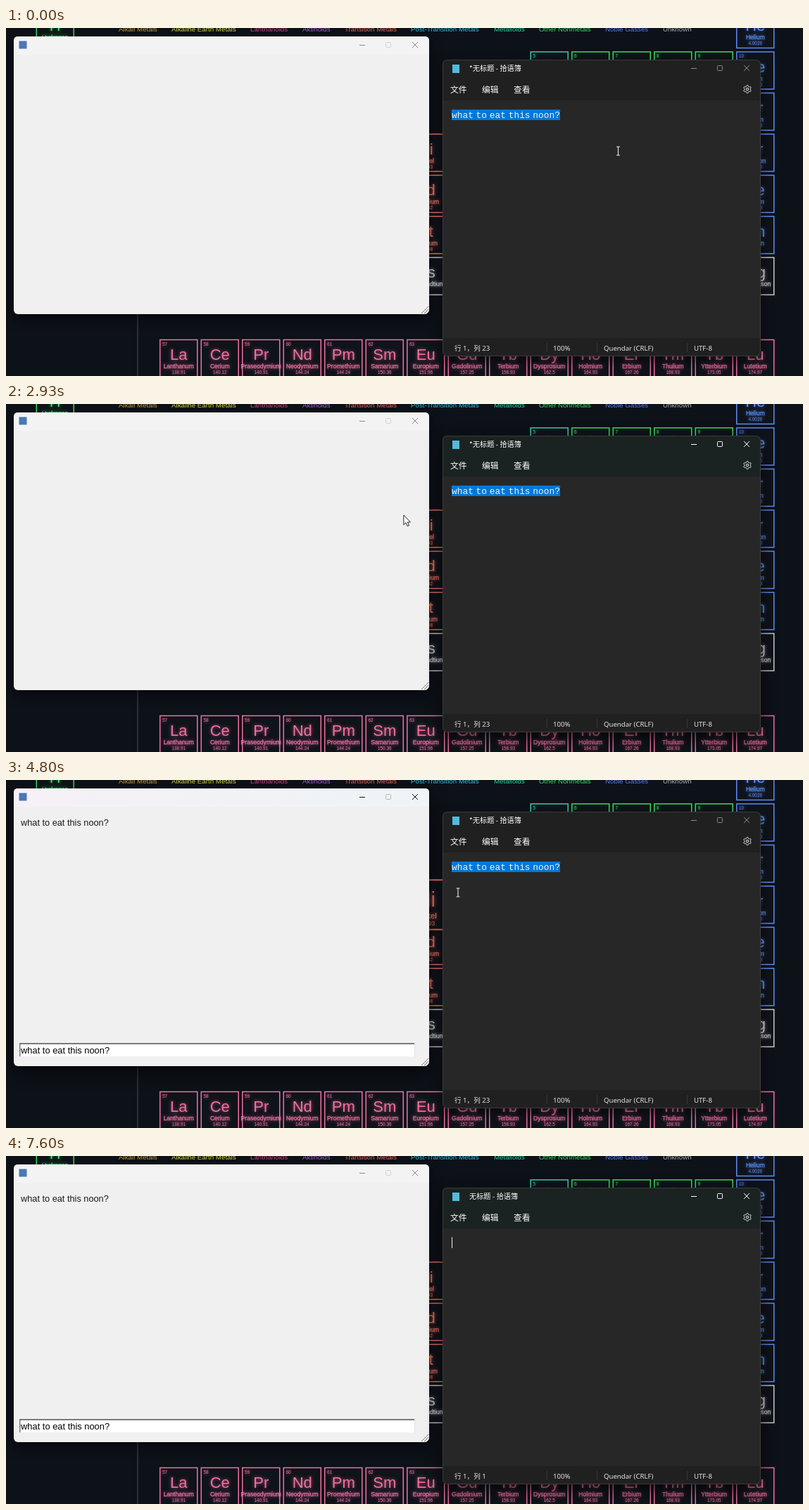
These frames come from a looping animation (1132 by 495 pixels, 8 s). An HTML page:

```html
<!DOCTYPE html>
<html lang="zh">
<head>
<meta charset="utf-8">
<style>
html, body { margin: 0; width: 100%; height: 100%; overflow: hidden; background: #0d1118; }
svg { display: block; font-family: "Liberation Sans", Arial, sans-serif; }
text { white-space: pre; }
.tile text { text-anchor: middle; fill: currentColor; }
.glow { filter: drop-shadow(0 0 2.5px color-mix(in srgb, currentColor 70%, transparent)); }
.window { filter: drop-shadow(0 7px 8px rgba(0, 0, 0, .5)); }
.window.active { filter: drop-shadow(0 8px 11px rgba(0, 0, 0, .68)); }
.buttons { fill: none; stroke: #8a8a8a; }
#form .off { stroke: #d2d2d2; }
#form.active .buttons { stroke: #111; }
#form.active .off { stroke: #b4b4b4; }
#pad.active .buttons { stroke: #fff; }
.cjk { font-family: "Noto Sans CJK SC", "Noto Sans CJK", sans-serif; fill: #fff; }
.status { font: 9.6px "Noto Sans", "Noto Sans CJK SC", sans-serif; fill: #e4e4e4; }
#typed { font: 12.87px "Liberation Mono", monospace; word-spacing: -3.96px; fill: #f2f2f2; }
</style>
</head>
<body>
<script>
const LOOP = 8000, STEP = 1000 / 15;
const PITCH = 58.5, LEFT = 42.5, TOP = 33.2, SIZE = 54.5;
const PHRASE = 'what to eat this noon?';
const PINK = '#f0709f', GREEN = '#38de60', TEAL = '#32d3ab', BLUE = '#5a8df4', RED = '#ef7061', GRAY = '#cacaca';

const text = (x, y, size, value, attrs = '') =>
  `<text x="${x}" y="${y}" font-size="${size}" ${attrs}>${value}</text>`;
const rect = (x, y, w, h, fill, attrs = '') =>
  `<rect x="${x}" y="${y}" width="${w}" height="${h}" fill="${fill}" ${attrs}/>`;

function tile(x, y, color, [number, symbol, name, mass], id = '') {
  return `<g id="${id}"><g class="tile" style="color:${color}" transform="translate(${x} ${y})">
    ${rect(.75, .75, SIZE - 1.5, SIZE - 1.5, '#0f131a', 'stroke="currentColor" stroke-width="1.5"')}
    <g class="glow">
    ${text(4, 9, 6.4, number, 'style="text-anchor:start"')}
    ${text(SIZE / 2, 29.5, 22, symbol)}
    ${text(SIZE / 2, 41.6, 8.6, name, 'stroke="currentColor" stroke-width=".25"')}
    ${text(SIZE / 2, 49.6, 6.4, mass)}</g></g></g>`;
}
const cell = (column, row, color, spec, id) =>
  tile(LEFT + (column - 1) * PITCH, TOP + (row - 2) * PITCH, color, spec.split(' '), id);

const legend = [
  [160, '#c79b3a', 'Alkali Metals'], [235, '#d2d445', 'Alkaline Earth Metals'],
  [347, '#b94a7c', 'Lanthanoids'], [421, '#a563bd', 'Aktinoids'],
  [481, '#dc6856', 'Transition Metals'], [575, '#35b9cf', 'Post-Transition Metals'],
  [693, '#2bcf9c', 'Metalloids'], [757, '#3bd65f', 'Other Nonmetals'],
  [851, '#567fe0', 'Noble Gasses'], [933, '#a9a9a9', 'Unknown'],
].map(([x, color, label]) => text(x, 5.3, 9.75, label, `fill="${color}"`)).join('');

const lanthanoids = `La Lanthanum 138.91,Ce Cerium 140.12,Pr Praseodymium 140.91,Nd Neodymium 144.24,
Pm Promethium 144.24,Sm Samarium 150.36,Eu Europium 151.96,Gd Gadolinium 157.25,Tb Terbium 158.93,
Dy Dysprosium 162.5,Ho Holmium 164.93,Er Erbium 167.26,Tm Thulium 168.93,Yb Ytterbium 173.05,
Lu Lutetium 174.97`.split(',')
  .map((spec, i) => tile(218 + i * PITCH, 442.7, PINK, [57 + i, ...spec.trim().split(' ')])).join('');

const nobles = ['2 He Helium 4.0026', '10 Ne Neon 20.180', '18 Ar Argon 39.948', '36 Kr Krypton 83.798',
  '54 Xe Xenon 131.29', '86 Rn Radon 222', '118 Og Oganesson 294']
  .map((spec, i) => cell(18, i + 1, i < 6 ? BLUE : GRAY, spec)).join('');

const table = legend + lanthanoids + nobles + cell(1, 1, GREEN, '1 H Hydrogen 1.008') +
  ['5 B Boron 10.81', '6 C Carbon 12.011', '7 N Nitrogen 14.007', '8 O Oxygen 15.999', '9 F Fluorine 18.998']
    .map((spec, i) => cell(13 + i, 2, i ? GREEN : TEAL, spec)).join('') +
  cell(10, 5, RED, '46 Pd Palladium 106.42') + cell(10, 6, RED, '78 Pt Platinum 195.08') +
  cell(10, 7, GRAY, '110 Ds Darmstadtium 281') + cell(10, 4, RED, '28 Ni Nickel 58.693', 'nickel');

const buttons = (x, y, off = '') => `<g class="buttons">
  <path d="M${x - 4} ${y + .5}h8"/>
  <rect class="${off}" x="${x + 33.5}" y="${y - 3.5}" width="7" height="7" rx="1"/>
  <path d="M${x + 71} ${y - 4}l8 8m0 -8l-8 8"/></g>`;

const form = `<g id="form" class="window">
  ${rect(11, 12, 590, 395, '#f0f0f0', 'rx="6"')}
  <path d="M11 38V18q0-6 6-6H595q6 0 6 6V38z" fill="#f3f3f3"/>
  <path id="formTint" d="M11 38V18q0-6 6-6H595q6 0 6 6V38z" fill="url(#tint)"/>
  ${rect(18.5, 18.5, 11, 11, '#4a78b8')}
  ${buttons(506, 24, 'off')}
  <path d="M590 406l10-10m-6 10l6-6m-2 6l2-2" stroke="#777" fill="none"/>
  <g id="dropped" fill="#1a1a1a">
    ${text(21, 65, 12.75, PHRASE)}
    ${rect(19, 374, 562, 20, '#e3e3e3')}${rect(19, 374, 561, 19, '#7a7a7a')}${rect(20.5, 376, 559.5, 17.5, '#fff')}
    ${text(21, 389, 12.9, PHRASE, 'fill="#000"')}
  </g></g>`;

const gear = Array.from({ length: 48 }, (_, i) => {
  const angle = i / 48 * 2 * Math.PI, r = 4.8 + .8 * Math.tanh(2 * Math.cos(angle * 6));
  return `${(1053 + r * Math.sin(angle)).toFixed(2)},${(87 - r * Math.cos(angle)).toFixed(2)}`;
}).join(' ');

const pad = `<g id="pad" class="window">
  ${rect(620, 45, 452, 422, '#202020', 'rx="6"')}
  <path id="padTint" d="M620 103V51q0-6 6-6H1066q6 0 6 6V103z" fill="#1b2322"/>
  ${rect(620, 103, 452, 338, '#272727')}
  ${rect(620.5, 45.5, 451, 421, 'none', 'rx="6" stroke="#3b3b3b"')}
  ${rect(634, 52, 10, 12, '#56b9dc')}
  ${text(658, 61, 10.2, '', 'id="title" class="cjk"')}
  ${buttons(977, 57)}
  ${text(631, 92, 11.8, '文件', 'class="cjk"')}${text(676, 92, 11.8, '编辑', 'class="cjk"')}${text(721, 92, 11.8, '查看', 'class="cjk"')}
  <g fill="none" stroke="#eee"><polygon points="${gear}"/><circle cx="1053" cy="87" r="1.7"/></g>
  ${rect(633, 116, 154, 15, '#0078d7', 'id="selection"')}
  <text id="typed" x="633" y="127.5"></text>
  ${rect(0, 115.5, 1, 15.5, '#eee', 'id="caret"')}
  <text id="place" class="status" x="637" y="459"></text>
  <text class="status" x="777" y="459">100%</text>
  <text class="status" x="849" y="459">Quendar (CRLF)</text>
  <text class="status" x="977" y="459">UTF-8</text>
  <path d="M768.5 448v13M839.5 448v13M967.5 448v13" stroke="#383838"/></g>`;

document.body.innerHTML = `<svg width="1132" height="495" viewBox="0 0 1132 495">
  <defs><linearGradient id="tint"><stop stop-color="#f6f1f6"/><stop offset="1" stop-color="#eef4f7"/></linearGradient></defs>
  ${rect(0, 0, 1132, 495, '#0d1118')}
  <path d="M187 400V495" stroke="#4c4e52"/>
  ${table}${form}${pad}
  <path id="arrow" d="M0 0V13.6L3.2 10.7L5.3 15.8L7.6 14.8L5.5 9.9H9.5Z" fill="#fff" stroke="#111" stroke-width=".9"/>
  <path id="beam" d="M-2.5 -6h2l.5 .5l.5 -.5h2M0 -5.5V5.5M-2.5 6h2l.5 -.5l.5 .5h2" fill="none" stroke="#e8e8e8" stroke-width="1.1"/>
</svg>`;

const el = Object.fromEntries([...document.querySelectorAll('[id]')].map(node => [node.id, node]));
const show = (node, on) => node.style.display = on ? '' : 'none';
const ramp = (t, from, to) => Math.min(1, Math.max(0, (t - from) / (to - from)));

// Pointer path: time, x, y
const path = [
  [0, 869.5, 175], [400, 849, 157], [867, 849, 157], [933, 848.5, 150], [1733, 645, 124], [2067, 645, 124],
  [2133, 597, 139], [2867, 597, 139], [2933, 565, 158], [3467, 295, 324], [3733, 272, 360], [3933, 272, 360],
  [4600, 606, 186], [4800, 642, 160], [5067, 794, 140], [5267, 800, 148], [5467, 800, 148],
  [5800, 803.5, 152], [5867, 805, 152], [LOOP, 805, 152],
];
function pointer(t) {
  const i = path.findIndex((point, k) => k && t <= point[0]);
  const [t0, x0, y0] = path[i - 1], [t1, x1, y1] = path[i];
  const k = ramp(t, t0, t1);
  return [x0 + (x1 - x0) * k, y0 + (y1 - y0) * k];
}

function draw(t) {
  const padActive = t > 1650 && t < 3390 || t > 5050;
  const formActive = t > 3390 && t < 5050;
  el.pad.classList.toggle('active', padActive);
  el.form.classList.toggle('active', formActive);
  el.padTint.style.opacity = ramp(t, 1550, 1700) - ramp(t, 3390, 3640) + ramp(t, 5040, 5240);
  el.formTint.style.opacity = ramp(t, 3390, 3600) - ramp(t, 5040, 5240);
  show(el.dropped, t > 3590);

  const zoom = 1 + .33 * (ramp(t, 4530, 4760) - ramp(t, 4800, 5050));
  const cx = LEFT + 9 * PITCH + SIZE / 2, cy = TOP + 2 * PITCH + SIZE / 2;
  el.nickel.setAttribute('transform', `translate(${cx} ${cy}) scale(${zoom}) translate(${-cx} ${-cy})`);

  // Backspace once, then held down: two letters a step
  const repeats = t < 6860 ? 0 : Math.floor((t - 6860) / STEP) + 1;
  const length = t < 6390 ? 22 : Math.max(0, 21 - 2 * repeats);
  const selected = t < 5050;
  el.typed.textContent = PHRASE.slice(0, length);
  el.title.textContent = (t < 7590 ? '*' : '') + '无标题 - 拾语簿';
  el.place.textContent = `行 1，列 ${length + 1}`;
  show(el.selection, selected);
  show(el.caret, !selected && (t < 5590 || t > 6120));
  el.caret.setAttribute('x', 633 + (length && el.typed.getComputedTextLength()));

  const [x, y] = pointer(t);
  const isArrow = x < 620 || selected && x < 787 && y < 131;
  show(el.arrow, isArrow);
  show(el.beam, !isArrow && t < 6390);
  for (const node of [el.arrow, el.beam]) node.setAttribute('transform', `translate(${x} ${y})`);
}

const start = performance.now();
function tick() {
  const t = (performance.now() - start) % LOOP;
  draw(Math.floor((t + 4) / STEP) * STEP % LOOP);
  requestAnimationFrame(tick);
}
tick();
</script>
</body>
</html>
```
